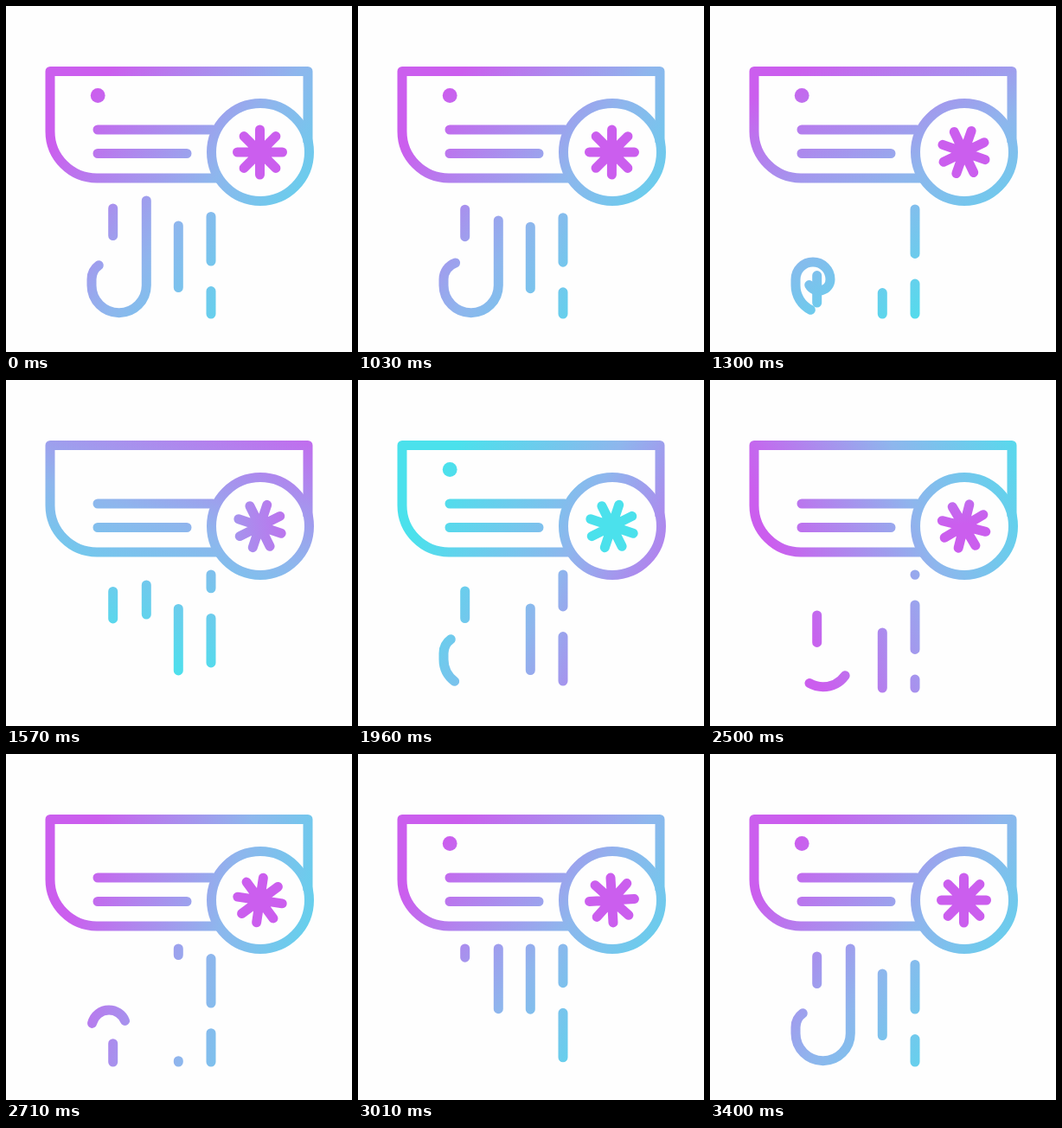
Animation, 400 px wide and 400 px high, one loop 3.43 s. Source, as an HTML page:

```html
<!DOCTYPE html>
<html lang="en">
<head>
<meta charset="utf-8">
<title>Air conditioner</title>
<style>
  html, body { margin: 0; width: 100%; height: 100%; overflow: hidden; background: #fefefe; }
  svg { display: block; width: 100vw; height: 100vh; }
  .line { fill: none; stroke: url(#tint); stroke-width: 11; stroke-linecap: round; stroke-linejoin: round; }
</style>
</head>
<body>
<svg viewBox="0 0 400 400">
  <defs>
    <linearGradient id="tint" gradientUnits="userSpaceOnUse" x1="80" y1="185" x2="420" y2="185">
      <stop offset="0" stop-color="#cb5eee"/>
      <stop offset=".5" stop-color="#8eb6ed"/>
      <stop offset="1" stop-color="#4be1ec"/>
    </linearGradient>
  </defs>
  <g class="line">
    <path stroke-linecap="butt" d="M244 199H105A54 54 0 0 1 51 145V75.5H349V158"/>
    <path d="M106 143H239M106 170.5H209"/>
    <circle cx="294" cy="169" r="56.5"/>
    <path id="star"/>
    <path id="bars"/>
    <path class="hook"/>
    <path class="hook"/>
  </g>
  <circle id="dot" cx="106.2" cy="103.5" r="8.4" fill="url(#tint)"/>
</svg>
<script>
const LOOP = 3430, HOLD = 1030, STEP = 30, STEPS = 80;
const TOP = 225, BOTTOM = 356, TRAVEL = 775;
const $ = s => document.querySelector(s);
const tint = $('#tint'), star = $('#star'), bars = $('#bars'), dot = $('#dot');
const hooks = document.querySelectorAll('.hook');

// Columns of falling dashes: x, start, length, passes per loop
const columns = [
  [123.7, 234, 31.5, 4],
  [199.3, 254, 71.5, 4],
  [237, 243.5, 51.5, 9]
];

// Runs of the curling draught: distance of tail and head by step
const HOOK_END = 302.7;
const runs = [
  { tail: [[0, 0], [1, 23], [19, 302], [20, 310]], head: [[0, 223], [1, 229], [7, 303]] },
  { tail: [[18, 0], [19, 12], [32, 168], [43, 294], [44, 306]], head: [[15, 0], [19, 46], [32, 223], [38, 303]] },
  { tail: [[41, 0], [43, 27], [57, 209], [64, 304]], head: [[38, 0], [43, 69], [57, 259], [60, 303]] },
  { tail: [[80, 0]], head: [[62, 0], [78, 223]] }
];

for (const h of hooks) {
  h.setAttribute('d', 'M162.3 225V323A31.6 31.6 0 0 1 99 323V316A20 20 0 0 1 139 316A13 13 0 0 1 114.7 322.5');
}
star.setAttribute('d', Array.from({ length: 4 }, (_, i) => {
  const x = 26 * Math.sin(i * Math.PI / 4), y = 26 * Math.cos(i * Math.PI / 4);
  return `M${-x} ${-y}L${x} ${y}`;
}).join(''));

const smooth = x => { x = Math.min(1, Math.max(0, x)); return x * x * (3 - 2 * x); };

// cubic-bezier(.18, 0, .53, 1)
function ease(x) {
  let lo = 0, hi = 1;
  for (let i = 0; i < 24; i++) {
    const s = (lo + hi) / 2, r = 1 - s;
    if (.54 * s * r * r + 1.59 * s * s * r + s * s * s < x) lo = s; else hi = s;
  }
  return smooth(hi);
}

function track(knots, n) {
  if (n <= knots[0][0]) return knots[0][1];
  for (let i = 1; i < knots.length; i++) {
    const [a, va] = knots[i - 1], [b, vb] = knots[i];
    if (n <= b) return va + (vb - va) * (n - a) / (b - a);
  }
  return knots[knots.length - 1][1];
}

function column([x, start, length, passes], shift) {
  const period = TRAVEL / passes;
  let d = '';
  for (let y = start + shift % period - 3 * period; y < BOTTOM; y += period) {
    const a = Math.max(TOP, y), b = Math.min(BOTTOM, y + length);
    if (b > a) d += `M${x} ${a}V${b}`;
  }
  return d;
}

function drawHooks(n) {
  const spans = runs
    .map(r => [track(r.tail, n), Math.min(HOOK_END, track(r.head, n))])
    .filter(([a, b]) => b > a);
  hooks.forEach((h, i) => {
    const span = spans[i];
    h.style.display = span ? '' : 'none';
    if (!span) return;
    h.setAttribute('stroke-dasharray', `${span[1] - span[0]} 999`);
    h.setAttribute('stroke-dashoffset', -span[0]);
  });
}

function render(ms) {
  const t = ms % LOOP;
  const n = t < HOLD ? 0 : Math.min(STEPS, Math.floor((t - HOLD) / STEP) + 1);
  const shift = TRAVEL * ease(n / STEPS);
  tint.setAttribute('gradientTransform', `rotate(${38 + 360 * smooth(n / 67)} 250 185)`);
  star.setAttribute('transform', `translate(293.5 169) rotate(${360 * smooth(n / 71)})`);
  bars.setAttribute('d', columns.map(c => column(c, shift)).join(''));
  dot.style.display = (n >= 13 && n < 26) || (n >= 50 && n < 63) ? 'none' : '';
  drawHooks(n);
}

const begin = performance.now();
function frame() {
  render(performance.now() - begin);
  requestAnimationFrame(frame);
}
frame();
</script>
</body>
</html>
```
